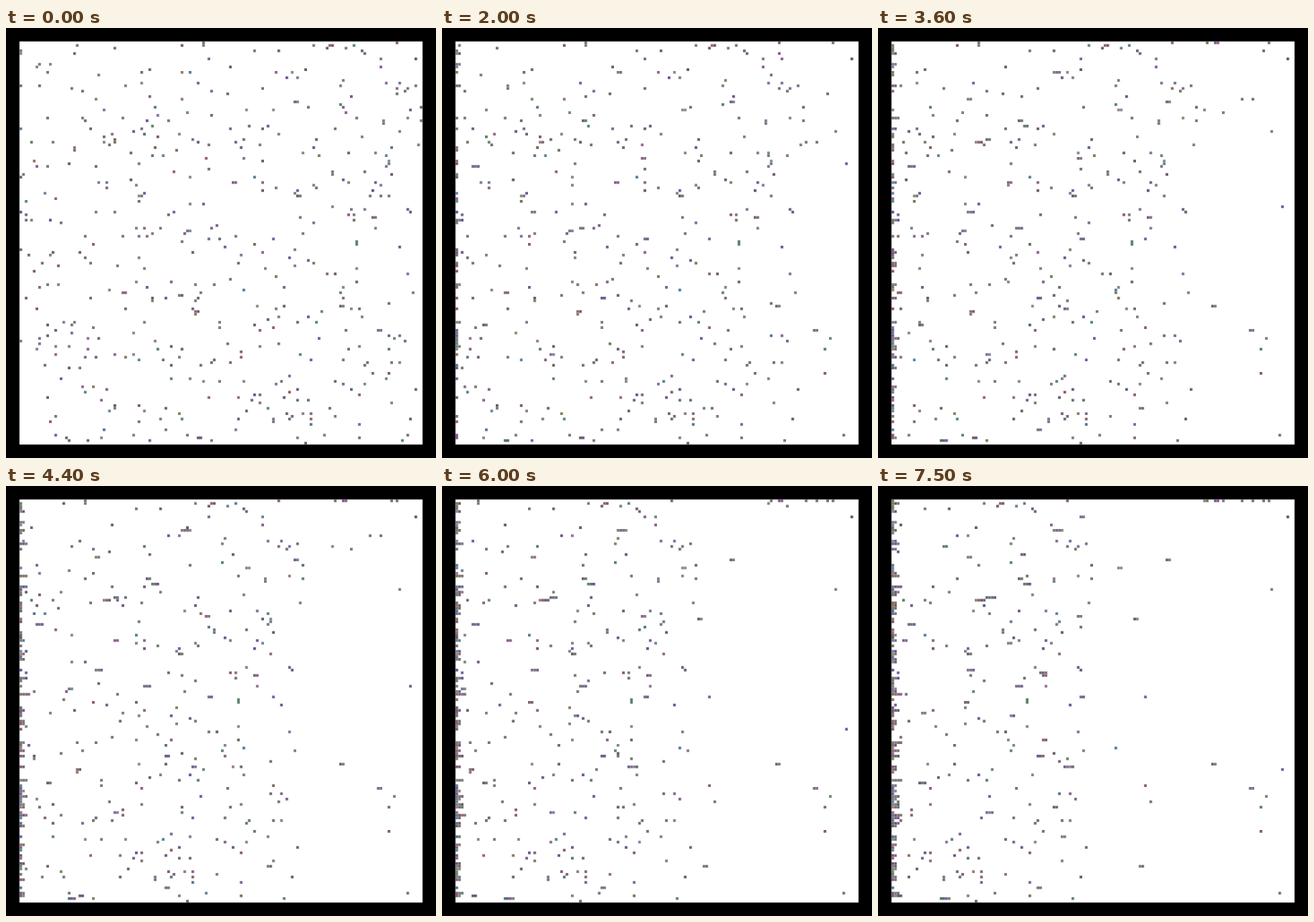
Animation of 600 by 600 pixels, one loop 7.6 s. Source, as an HTML page with a canvas:

```html
<!DOCTYPE html>
<html lang="en">
<head>
<meta charset="utf-8">
<title>Drifting particles</title>
<style>
html, body { margin: 0; width: 100%; height: 100%; overflow: hidden; background: #000; }
canvas { display: block; width: 600px; height: 600px; }
</style>
</head>
<body>
<canvas id="stage" width="600" height="600"></canvas>
<script>
const SIZE = 150, MARGIN = 5, CELL = 3.75, STEP_MS = 100, STEPS = 76;
const DRIFTERS = 400, ANCHORS = 45, CLIMBERS = 10, OPEN_X = 100;
const ctx = document.getElementById('stage').getContext('2d');

// Particles that rest alone on the emptying right side
const loners = [
  [102, 22], [103, 22], [119, 98], [120, 98], [133, 107], [134, 107],
  [141, 33], [147, 6], [139, 110], [137, 114], [137, 123], [144, 146]
];

let seed = 20417;
function random() {
  seed = (seed + 0x6D2B79F5) | 0;
  let n = Math.imul(seed ^ (seed >>> 15), 1 | seed);
  n = (n + Math.imul(n ^ (n >>> 7), 61 | n)) ^ n;
  return ((n ^ (n >>> 14)) >>> 0) / 4294967296;
}
const between = (lo, hi) => Math.floor(lo + random() * (hi - lo));
const tint = () => `rgb(${between(88, 150)},${between(85, 140)},${between(92, 160)})`;

const rows = Array.from({ length: SIZE }, () => []);
const climbers = [];

function place(x, y, fixed) {
  const row = rows[y];
  if (row.some(p => p.x === x || (p.fixed && p.x > OPEN_X && p.x < x))) return false;
  row.push({ x, fixed, color: tint() });
  return true;
}

function scatter(count, maxX, fixed) {
  while (count > 0) {
    if (place(between(0, maxX), between(0, SIZE), fixed)) count--;
  }
}

for (const [x, y] of loners) rows[y].push({ x, fixed: true, color: tint() });
scatter(ANCHORS, OPEN_X, true);
scatter(DRIFTERS, SIZE, false);

// Most climbers rise; those by the right wall sink.
for (let i = 0; i < CLIMBERS; i++) {
  const x = between(114, SIZE);
  climbers.push({ x, y: between(15, 65), dir: x < 145 ? -1 : 1, color: tint() });
}

// Each drifter halts against the wall or its left neighbour.
for (const row of rows) {
  row.sort((a, b) => a.x - b.x);
  let free = 0;
  for (const p of row) {
    p.rest = p.fixed ? p.x : free;
    free = p.rest + 1;
  }
}

function box(x, y, size, color) {
  ctx.fillStyle = color;
  ctx.fillRect((MARGIN + x) * CELL, (MARGIN + y) * CELL, size * CELL, size * CELL);
}

function draw(step) {
  ctx.fillStyle = '#000';
  ctx.fillRect(0, 0, 600, 600);
  box(0, 0, SIZE, '#fff');
  rows.forEach((row, y) => {
    for (const p of row) box(Math.max(p.rest, p.x - step), y, 1, p.color);
  });
  for (const c of climbers) {
    box(c.x, Math.min(SIZE - 1, Math.max(0, c.y + c.dir * step)), 1, c.color);
  }
}

let shown = -1;
function tick() {
  const step = Math.floor(performance.now() / STEP_MS) % STEPS;
  if (step !== shown) draw(shown = step);
  requestAnimationFrame(tick);
}
tick();
</script>
</body>
</html>
```
